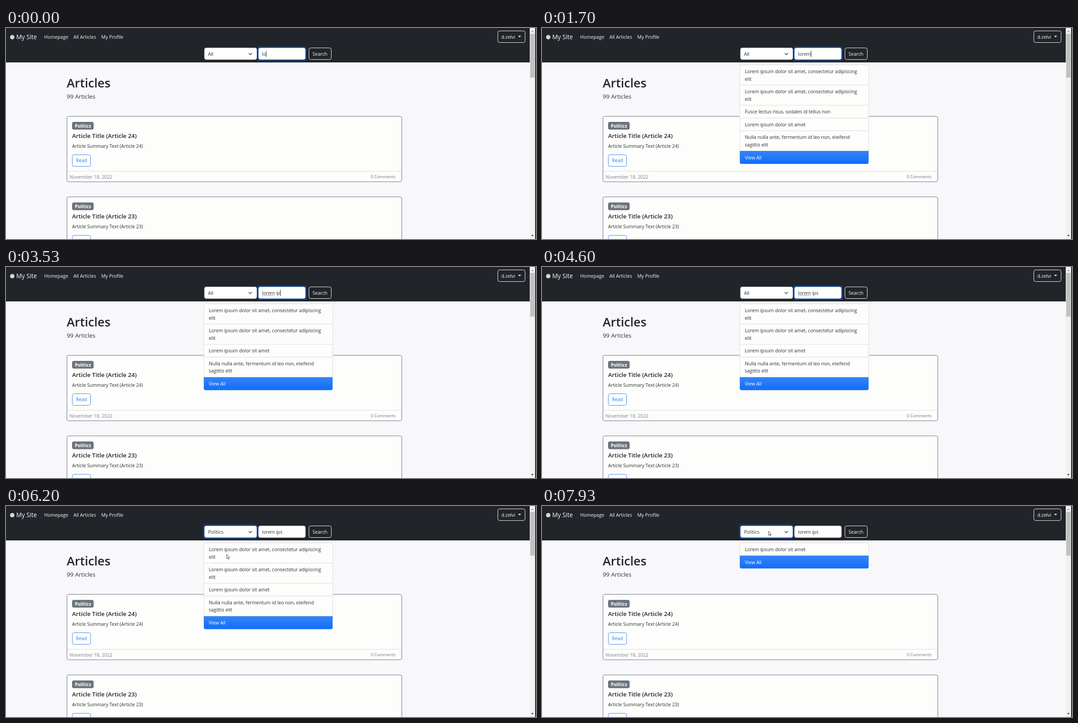
An HTML page for the animation above (8000 ms loop, 1187 by 472 pixels).

```html
<!DOCTYPE html>
<html lang="en">
<head>
<meta charset="utf-8">
<title>Article search</title>
<style>
  html, body { margin: 0; width: 100%; height: 100%; overflow: hidden; background: #f8f8fa; }
  svg { display: block; width: 1187px; height: 472px; }
  text { font: 10.55px "Open Sans", "Noto Sans", sans-serif; fill: #2b2f33; white-space: pre; }
  .nav text { fill: #f8f9fa; }
  .nav .field { fill: #2b2f33; }
  .outline { fill: none; stroke: #f8f9fa; }
  .box { fill: #fff; stroke: #ced4da; }
  .glow { fill: #0d6efd; }
  .line { stroke: #d9dadd; }
</style>
</head>
<body>
<svg viewBox="0 0 1187 472">
  <defs>
    <linearGradient id="blue" x2="0" y2="1">
      <stop stop-color="#3584f5"/><stop offset="1" stop-color="#116dfb"/>
    </linearGradient>
    <g id="arrow" fill="#fff" stroke="#222" stroke-width=".8">
      <path d="M0 0V9.6L2.2 7.6 3.7 10.9 5.1 10.3 3.7 7.1H6.6Z"/>
    </g>
    <g id="hand" fill="#fff" stroke="#222" stroke-width=".8" stroke-linejoin="round">
      <path d="M-1 1Q0-.4 1 1V5Q2 4 3 5.2 4 4.4 4.8 5.8 6 5.2 6.2 6.8V9.5L5 13H-.6L-3.6 9Q-4.4 7.4-3 7.2L-1 8.6Z"/>
    </g>
    <g id="beam" fill="none" stroke="#222" stroke-width=".8">
      <path d="M-2-5.5Q0-5.5 0-4.5Q0-5.5 2-5.5M0-5V5M-2 5.5Q0 5.5 0 4.5Q0 5.5 2 5.5"/>
    </g>
  </defs>

  <text x="136" y="132.5" style="font-size:27.2px;font-weight:600;fill:#212529">Articles</text>
  <text x="136" y="158.3" style="font-size:13.3px">99 Articles</text>
  <g id="cards"></g>

  <g class="nav">
    <rect width="1173" height="77" fill="#212529"/>
    <circle cx="14" cy="20.5" r="5" fill="#d3d5d7"/>
    <text x="23" y="24.6" style="font-size:13.7px">My Site</text>
    <text x="85.5" y="23.5">Homepage</text>
    <text x="151" y="23.5">All Articles</text>
    <text x="213.5" y="23.5">My Profile</text>
    <rect class="outline" x="1101.5" y="6.5" width="61" height="26" rx="4"/>
    <text x="1109.5" y="23.5">d.zelvi</text>
    <path d="M1147 17.5h6.6l-3.3 3.4z" fill="#f8f9fa"/>

    <rect class="glow" id="selectGlow" x="441" y="41" width="123" height="33" rx="6"/>
    <rect class="glow" id="inputGlow" x="562" y="41" width="112" height="33" rx="6"/>
    <rect class="box" id="selectBox" x="444.5" y="44.5" width="117" height="26" rx="4"/>
    <rect class="box" id="inputBox" x="565.5" y="44.5" width="105" height="26" rx="4"/>
    <text class="field" id="choice" x="452.5" y="61.6"></text>
    <path d="M543.5 56.2l3.6 3.6 3.6-3.6" fill="none" stroke="#343a40" stroke-width="1.4"/>
    <text class="field" id="query" x="573.3" y="61.6"></text>
    <path id="squiggle" fill="none" stroke="#e0433c" stroke-width=".8"/>
    <path id="caret" d="M0 51V65" stroke="#222"/>
    <rect class="outline" x="678.5" y="44.5" width="50" height="26" rx="4"/>
    <text x="686.5" y="61.6">Search</text>
  </g>

  <g id="menu"></g>

  <rect x="1173" width="12" height="472" fill="#f1f1f1"/>
  <rect x="1174" y="13" width="10" height="98" fill="#c1c1c1"/>
  <path d="M1176 9h6l-3-3.5z" fill="#a3a3a3"/>
  <path d="M1176 463h6l-3 3.5z" fill="#505050"/>
  <rect x="1185" width="2" height="472" fill="#26282b"/>
  <use id="pointer"/>
</svg>
<script>
const $ = id => document.getElementById(id);
const LOOP = 8000;

const card = (n, y) => `<g transform="translate(0 ${y})">
  <rect x="136.5" y="197.5" width="750" height="146.5" rx="4" fill="#fdfdfb" stroke="#686884"/>
  <path class="line" d="M137 320.5H886"/>
  <rect x="148" y="210" width="48.3" height="17.3" rx="4" fill="#6c757d"/>
  <text x="154.3" y="222.5" style="font-size:10px;font-weight:700;fill:#fff">Politics</text>
  <text x="148" y="246.2" style="font-size:13.3px;font-weight:600;fill:#212529">Article Title (Article ${n})</text>
  <text x="148" y="267.5">Article Summary Text (Article ${n})</text>
  <rect x="148.5" y="283.5" width="41" height="26" rx="4" fill="none" stroke="#3d85f5"/>
  <text x="156.8" y="300.2" style="fill:#2f7cf6">Read</text>
  <text x="142.3" y="336.6" style="fill:#7a8188">November 18, 2022</text>
  <text x="817" y="335.6" style="font-size:9.3px;fill:#6c757d">0 Comments</text>
</g>`;
$('cards').innerHTML = card(24, 0) + card(23, 180.3);
$('squiggle').setAttribute('d', 'M573.5 64.6' + 'l1-1.2 1 1.2'.repeat(14));

const dolor = 'Lorem ipsum dolor sit amet';
const long = dolor + ', consectetur adipiscing\nelit';
const nulla = 'Nulla nulla ante, fermentum id leo non, eleifend\nsagittis elit';
const lists = {
  none: [],
  recent: [24, 23, 22, 21, 20].map(n => `Article Title (Article ${n})`),
  lorem: [long, long, 'Fusce lectus risus, sodales id tellus non', dolor, nulla],
  ips: [long, long, dolor, nulla],
  politics: [dolor]
};

// Each step is [start time, value]; the last one reached holds.
const steps = {
  query: [[0, 'lo'], [1100, 'lor'], [1200, 'lore'], [1700, 'lorem'], [2830, 'lorem '],
          [3230, 'lorem i'], [3270, 'lorem ip'], [3630, 'lorem ips']],
  caret: [[0, 1], [530, 0], [1070, 1], [2230, 0], [2730, 1], [4170, 0], [4700, 1], [4930, 0]],
  list: [[0, 'none'], [300, 'recent'], [1530, 'lorem'], [3500, 'ips'], [6230, 'politics']],
  choice: [[0, 'All'], [5430, 'Politics']]
};
const now = (name, t) => steps[name].findLast(s => s[0] <= t)[1];

// Pointer path: [time, x, y], eased between points.
const path = [[4600, 598, 60], [4900, 508, 60], [4960, 506, 60], [5270, 494.5, 108.3],
              [7530, 494.5, 108.3], [7930, 507.3, 56]];
const clamp = v => Math.max(0, Math.min(1, v));
function pointerAt(t) {
  let [, x, y] = path[0];
  for (let i = 1; i < path.length; i++) {
    const [t0, x0, y0] = path[i - 1], [t1, x1, y1] = path[i];
    if (t < t0) break;
    const k = clamp((t - t0) / (t1 - t0)), e = k * k * (3 - 2 * k);
    x = x0 + (x1 - x0) * e;
    y = y0 + (y1 - y0) * e;
  }
  return [x, y];
}

function menu(items, hover) {
  if (!items.length) return '';
  const left = 443, top = 82.5, width = 288.5, row = 28.5, lead = 16.7;
  let y = top, rows = '';
  items.forEach((item, i) => {
    const lines = item.split('\n'), h = row + lead * (lines.length - 1), lit = hover && i == 0;
    if (lit) rows += `<rect x="${left}" y="${y}" width="${width}" height="${h}" fill="#f5f6f7"/>`;
    lines.forEach((line, j) => rows +=
      `<text x="454.3" y="${y + 18.3 + lead * j}"${lit ? ' style="fill:#6b7076"' : ''}>${line}</text>`);
    y += h;
    rows += `<path class="line" d="M${left} ${y}h${width}"/>`;
  });
  return `<rect x="${left}" y="${top}" width="${width}" height="${y - top + 12}" rx="4" fill="#fdfdfb" stroke="#dcdde0"/>${rows}
    <path d="M${left} ${y}h${width}v24.8a4 4 0 0 1-4 4h${8 - width}a4 4 0 0 1-4-4z" fill="url(#blue)"/>
    <text x="454.3" y="${y + 18.5}" style="fill:#fff">View All</text>`;
}

let shown;
function draw(t) {
  const query = now('query', t), list = now('list', t);
  const focus = clamp((t - 4930) / 150);   // moves from the input to the select
  $('query').textContent = query;
  $('choice').textContent = now('choice', t);
  $('caret').setAttribute('transform', `translate(${573.8 + $('query').getComputedTextLength()} 0)`);
  $('caret').style.opacity = now('caret', t);
  $('squiggle').style.opacity = t >= 2830 && t < 4930 ? 1 : 0;
  $('inputGlow').style.opacity = .3 * (1 - focus);
  $('selectGlow').style.opacity = .3 * focus;
  $('inputBox').style.stroke = focus < .5 ? '#86b7fe' : '';
  $('selectBox').style.stroke = focus < .5 ? '' : '#86b7fe';

  const [x, y] = pointerAt(t);
  const hover = list == 'politics' && t >= 6270 && y > 82.5;
  const kind = hover ? 'hand' : x > 564 ? 'beam' : 'arrow';
  $('pointer').setAttribute('href', '#' + kind);
  $('pointer').setAttribute('transform', `translate(${x} ${y})`);
  $('pointer').style.display = t > 4630 ? '' : 'none';

  const key = list + hover;
  if (key != shown) $('menu').innerHTML = menu(lists[list], hover);
  shown = key;
}

const start = performance.now();
function frame() {
  draw((performance.now() - start) % LOOP);
  requestAnimationFrame(frame);
}
frame();
</script>
</body>
</html>
```
